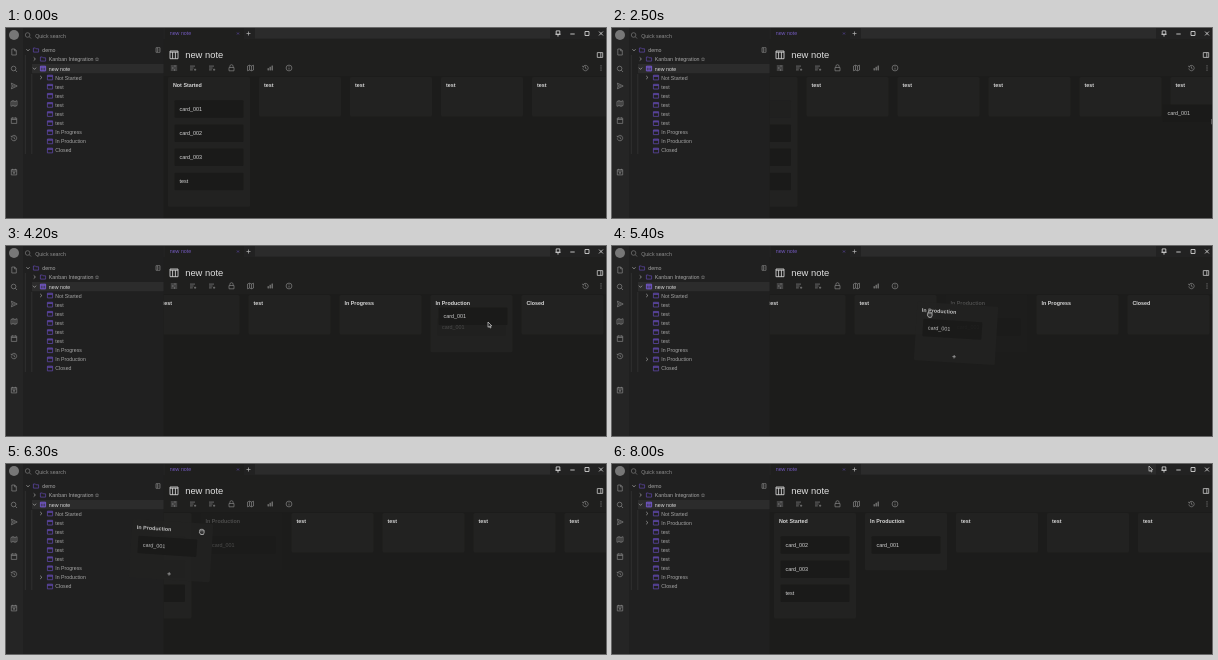
An HTML page that plays this animation: 600 by 190 pixels, repeating every 8.1 s.

```html
<!DOCTYPE html>
<html lang="en">
<head>
<meta charset="utf-8">
<title>Kanban board</title>
<style>
html, body { margin: 0; width: 100%; height: 100%; overflow: hidden; background: #1c1c1b; }
svg { display: block; width: 600px; height: 190px; }
text { font-family: "Liberation Sans", Arial, sans-serif; white-space: pre; }
</style>
</head>
<body>
<svg viewBox="0 0 600 190" xmlns="http://www.w3.org/2000/svg">
  <defs><clipPath id="view"><rect x="157.5" y="48" width="443" height="142"/></clipPath></defs>
  <g id="main"></g>
  <g id="board" clip-path="url(#view)"></g>
  <g id="side"></g>
  <g id="tree"></g>
  <g id="over"></g>
</svg>
<script>
const LOOP = 8100, STEP = 100;
const LEFT = 162, TOP = 49, PITCH = 91, WIDTH = 82, SLOT = 24.2, MAX_SCROLL = 374.5;
const DROP_CARD = 4300, GRAB_COLUMN = 5100, DROP_COLUMN = 7100;
const COLOR = { column: '#222221', card: '#1a1a19', text: '#d6d6d6', tree: '#a5a5a5', icon: '#858585', accent: '#6148ad' };
const COLUMNS = ['Not Started', 'test', 'test', 'test', 'test', 'test', 'In Progress', 'In Production', 'Closed'];
const MOVED = 'In Production';

const el = id => document.getElementById(id);
const clamp = (v, a, b) => Math.min(b, Math.max(a, v));
const rect = (x, y, w, h, fill, more = '') => `<rect x="${x}" y="${y}" width="${w}" height="${h}" fill="${fill}" ${more}/>`;
const label = (x, y, s, size = 5.3, fill = COLOR.text, more = '') =>
  `<text x="${x}" y="${y}" font-size="${size}" fill="${fill}" ${more}>${s}</text>`;
const icon = (x, y, d, color = COLOR.icon, width = .7) =>
  `<path transform="translate(${x} ${y})" d="${d}" fill="none" stroke="${color}" stroke-width="${width}"/>`;
const plus = (x, y) => icon(x, y, SHAPE.plus, '#c4c4c4', .7);

const SHAPE = {
  plus: 'M-1.7 0H1.7M0 -1.7V1.7',
  down: 'M-1.6 -.8L0 .9L1.6 -.8',
  right: 'M-.8 -1.6L.9 0L-.8 1.6',
  folder: 'M-2.6 -2H-.6L.2 -1.2H2.6V2.1H-2.6Z',
  pane: 'M-2.6 -2.3H2.6V2.4H-2.6ZM-2.6 -1.6H2.6M-2.6 -1.1H2.6',
  table: 'M-2.6 -2.3H2.6V2.4H-2.6ZM-2.6 -1.4H2.6M-.9 -1.4V2.4M.9 -1.4V2.4',
  file: 'M-2.2 -3H.8L2.3 -1.4V3H-2.2ZM.6 -3V-1.2H2.3',
  search: 'M1.9 -.5A2.3 2.3 0 1 1 -2.7 -.5A2.3 2.3 0 1 1 1.9 -.5M1.3 1.2L3 3',
  send: 'M-2.6 -2.8L3.2 0L-2.6 2.8L-1.8 0ZM-1.8 0H1',
  map: 'M-3 -2L-1 -2.8L1 -2L3 -2.8V2L1 2.8L-1 2L-3 2.8ZM-1 -2.8V2M1 -2V2.8',
  calendar: 'M-2.7 -2.4H2.7V2.9H-2.7ZM-2.7 -1H2.7M-1.4 -3.2V-2M1.4 -3.2V-2',
  clock: 'M-2.4 -1.2A2.7 2.7 0 1 1 -2.7 .4M-2.9 -2.2L-2.5 -.9L-1.2 -1.2M0 -1.5V.3L1.2 1',
  sliders: 'M-3.2 -2H3.2M-3.2 0H3.2M-3.2 2H3.2M1 -2.8V-1.2M-1.2 -.8V.8M.6 1.2V2.8',
  list: 'M-3 -1.9H2M-3 0H.6M-3 1.9H-.2M1 1.7H3.2M2.1 .6V2.8',
  lock: 'M-2.5 -.5H2.5V2.8H-2.5ZM-1.6 -.5V-1.7A1.6 1.6 0 0 1 1.6 -1.7V-.5',
  bars: 'M-2 2.4V.2M-1.6 2.4V.2M0 2.4V-1.2M.4 2.4V-1.2M2 2.4V-2.4M2.4 2.4V-2.4',
  info: 'M2.9 0A2.9 2.9 0 1 1 -2.9 0A2.9 2.9 0 1 1 2.9 0M0 -.4V1.6M0 -1.7V-1',
  panel: 'M-2.7 -2.4H2.7V2.4H-2.7ZM.8 -2.4V2.4',
  pin: 'M-1.8 -2.6H1.8V.8H-1.8ZM-2.6 .8H2.6M0 .8V3.1',
  square: 'M-2 -2H2V2H-2Z',
  cross: 'M-1.9 -1.9L1.9 1.9M-1.9 1.9L1.9 -1.9',
  star: 'M0 -1.7L.5 -.5L1.7 -.4L.8 .4L1.1 1.6L0 1L-1.1 1.6L-.8 .4L-1.7 -.4L-.5 -.5Z',
  arrow: 'M0 0V5.3L1.3 4.2L2.1 6L3 5.6L2.1 3.9H3.8Z',
  hand: 'M-2.2 0V-1.9Q-1.7 -2.6 -1.1 -1.9Q-.6 -3 0 -2.2Q.7 -2.8 1.1 -1.8Q2 -2 2.1 -1.1V1Q1.7 2 1.4 2.8H-1.3L-2.6 .7Q-2.8 -.1 -2.2 0Z'
};

// Each key is [time, ...values]; values ease between keys.
function track(keys, t) {
  let i = 0;
  while (i < keys.length - 2 && t >= keys[i + 1][0]) i++;
  const [a, b] = [keys[i], keys[i + 1]];
  const p = clamp((t - a[0]) / (b[0] - a[0]), 0, 1), e = p * p * (3 - 2 * p);
  return a.slice(1).map((v, k) => v + (b[k + 1] - v) * e);
}

const POINTER = [
  [500, 251, 6], [800, 240, 55], [1200, 219.5, 81.7], [1600, 219.5, 81.7], [2400, 600, 91], [3000, 600, 91],
  [3400, 536, 83], [4200, 482, 76], [4300, 482, 76], [4900, 440, 59], [5100, 437, 59],
  [5200, 423, 62], [5400, 318, 68.5], [5800, 181, 70], [6100, 181, 70], [6300, 196, 67.7],
  [6700, 300, 66], [7000, 322, 60], [7100, 322, 60], [7700, 523, 12], [7900, 537, 2]
];
const GRIP = [[5400, 12.5], [5800, 69.5]];

function scrollAt(t) {
  const speed = .585;
  return t < 5700 ? clamp((t - 2400) * speed, 0, MAX_SCROLL) : clamp((6400 - t) * speed, 0, MAX_SCROLL);
}

function drawMain() {
  const tools = [[168, 'sliders'], [187, 'list'], [206, 'list'], [225.5, 'lock'], [244.5, 'map'], [264, 'bars'], [283, 'info']];
  el('main').innerHTML =
    rect(157, 0, 443, 190, '#1c1c1b') + rect(157, 11, 443, 37, '#1f1f1e') +
    rect(157, 0, 443, 11, '#222222') + rect(159, 0, 79, 11, '#1f1f1e') + rect(249, 0, 295, 10.5, '#2b2b2b') +
    label(163.7, 7, 'new note', 5.3, '#7259bd') + icon(232, 5.5, 'M-1 -1L1 1M-1 1L1 -1', '#6148ad', .6) +
    icon(242.5, 5.5, 'M-2 0H2M0 -2V2', '#b5b5b5') +
    icon(552, 5.5, SHAPE.pin, '#d0d0d0', .9) + icon(566.5, 6, 'M-2.2 0H2.2', '#d0d0d0', .9) +
    icon(581, 5.5, SHAPE.square, '#d0d0d0', .9) + icon(595, 5.5, SHAPE.cross, '#d0d0d0', .9) +
    icon(168, 26.7, 'M-4 -3.7H4V4H-4ZM-4 -2.5H4M-1.4 -2.5V4M1.4 -2.5V4', '#d8d8d8', .85) +
    label(179.2, 30.2, 'new note', 9.4, '#e0e0e0') +
    tools.map(([x, name]) => icon(x, 40, SHAPE[name])).join('') +
    icon(594, 27, SHAPE.panel, '#c8c8c8', .8) + icon(579.5, 40, SHAPE.clock) +
    icon(595, 40, 'M0 -2.5V-1.7M0 -.4V.4M0 1.7V2.5', '#b0b0b0', .9);
}

function drawSide() {
  const launchers = [[24, 'file'], [41, 'search'], [58, 'send'], [75.5, 'map'], [92.5, 'calendar'], [110, 'clock'], [144, 'calendar']];
  el('side').innerHTML =
    rect(0, 0, 157.5, 190, '#202020') + rect(0, 0, 17, 190, '#252525') +
    '<circle cx="8" cy="7" r="5" fill="#777"/>' +
    launchers.map(([y, name]) => icon(8, y, SHAPE[name])).join('') + icon(8, 144.8, 'M-1.2 0H1.2M0 -1.2V1.2') +
    icon(22, 7.5, SHAPE.search, '#777') + label(29.2, 9.6, 'Quick search', 5.25, '#8d8d8d') +
    rect(26, 36, 131.5, 9.2, '#2c2c2c') +
    icon(0, 0, 'M19.3 27V126M25.8 46V126', '#414141', .5) +
    icon(152, 22, 'M-2 -2.3H2V2.3H-2ZM-.6 -2.3V2.3M.4 0H1.5', '#909090', .6) +
    icon(22, 22, SHAPE.down, '#aaa') + icon(30, 22, SHAPE.folder, COLOR.accent) + label(36.3, 24, 'demo', 5.25, COLOR.tree) +
    icon(28.5, 31, SHAPE.right, '#aaa') + icon(37, 31, SHAPE.folder, COLOR.accent) +
    label(42.8, 33, 'Kanban Integration', 5.3, COLOR.tree) + icon(91, 31.2, SHAPE.star, '#888', .5) +
    icon(28.5, 40.5, SHAPE.down, '#aaa') + icon(37, 40.5, SHAPE.table, '#7a5cd6', .9) +
    label(42.8, 42.5, 'new note', 5.3, '#d8d8d8');
}

function moveTo(index) {
  const order = COLUMNS.filter(name => name !== MOVED);
  order.splice(index, 0, MOVED);
  return order;
}

function drawTree(t) {
  const order = t >= DROP_COLUMN + 100 ? moveTo(1) : COLUMNS;
  el('tree').innerHTML = order.map((name, i) => {
    const y = 49.5 + i * 9.12;
    const open = name === 'Not Started' || (name === MOVED && t >= DROP_CARD);
    return (open ? icon(35, y, SHAPE.right, '#aaa') : '') +
      icon(44, y, SHAPE.pane, COLOR.accent, .75) + label(49.3, y + 2, name, 5.2, COLOR.tree);
  }).join('');
}

const card = (x, y, s, width = 69, opacity = 1) => `<g opacity="${opacity}">` +
  rect(x, y, width, 17.5, COLOR.card, 'rx="1"') + label(x + 5, y + 10.6, s, 5.4) + '</g>';

function column(x, name, cards, { ghostCard = '', opacity = 1, hover = false } = {}) {
  const height = cards.length ? 33 + SLOT * cards.length : 39.5;
  return `<g opacity="${opacity}">` + rect(x, TOP, WIDTH, height, COLOR.column, 'rx="1.5"') +
    label(x + 5, 59, name, 5.35, COLOR.text, 'font-weight="700"') +
    cards.map((s, i) => card(x + 6.5, 72.2 + i * SLOT, s, 69, s === ghostCard ? .22 : 1)).join('') +
    (hover ? plus(x + 39.5, TOP + height - 5) : '') + '</g>';
}

function drawBoard(t, [px]) {
  const scroll = scrollAt(t);
  const dragCard = t >= 1700 && t < DROP_CARD, dragColumn = t >= GRAB_COLUMN && t < DROP_COLUMN;
  const target = t < 3200 ? 'Not Started' : px > 510 ? 'Closed' : MOVED;
  const slot = dragColumn ? clamp(Math.floor((px + 30 + scroll - LEFT) / PITCH), 1, 7) : t < DROP_COLUMN ? 7 : 1;
  el('board').innerHTML = moveTo(slot).map((name, i) => {
    let cards = [];
    if (name === 'Not Started') cards = ['card_002', 'card_003', 'test'];
    const holder = t < 1700 ? 'Not Started' : dragCard ? target : MOVED;
    if (name === holder) cards = ['card_001', ...cards];
    const hover = (name === 'Not Started' && t >= 700 && t < 1700) ||
      (name === MOVED && ((t >= DROP_CARD && t < GRAB_COLUMN) || (t >= DROP_COLUMN && t < 7500)));
    return column(LEFT + i * PITCH - scroll, name, cards, {
      ghostCard: dragCard ? 'card_001' : '', opacity: dragColumn && name === MOVED ? .25 : 1, hover
    });
  }).join('');
}

function drawOver(t, [px, py]) {
  let out = '';
  if (t >= 1700 && t < DROP_CARD) out += card(px - 49.5, py - 14.5, 'card_001', 69, .95);
  if (t >= GRAB_COLUMN && t < DROP_COLUMN) {
    const [grip] = track(GRIP, t);
    out += `<g transform="translate(${px - grip} ${py - 12.8}) rotate(3.6)" opacity=".88">` +
      rect(0, 0, 81, 58.5, COLOR.column, 'rx="1.5"') +
      label(5, 9.8, MOVED, 5.35, COLOR.text, 'font-weight="700"') +
      card(7, 16.5, 'card_001', 59) + plus(40, 52.6) + '</g>';
  }
  if (t >= 500) {
    const hand = (t >= 1000 && t < 1700) || (t >= 4800 && t < 7200);
    out += `<path transform="translate(${px} ${py})" d="${hand ? SHAPE.hand : SHAPE.arrow}" ` +
      `fill="${hand ? '#333' : '#181818'}" stroke="#d4d4d4" stroke-width=".7" stroke-linejoin="round"/>`;
    if (hand) out += icon(px, py, 'M-1.1 -1.7V-.4M0 -1.9V-.4M1.1 -1.7V-.4', '#d4d4d4', .4);
  }
  el('over').innerHTML = out;
}

let last = -1;
function frame() {
  const t = Math.floor(performance.now() % LOOP / STEP) * STEP;
  if (t !== last) {
    last = t;
    const pointer = track(POINTER, t);
    drawBoard(t, pointer);
    drawTree(t);
    drawOver(t, pointer);
  }
  requestAnimationFrame(frame);
}

drawMain();
drawSide();
frame();
</script>
</body>
</html>
```
